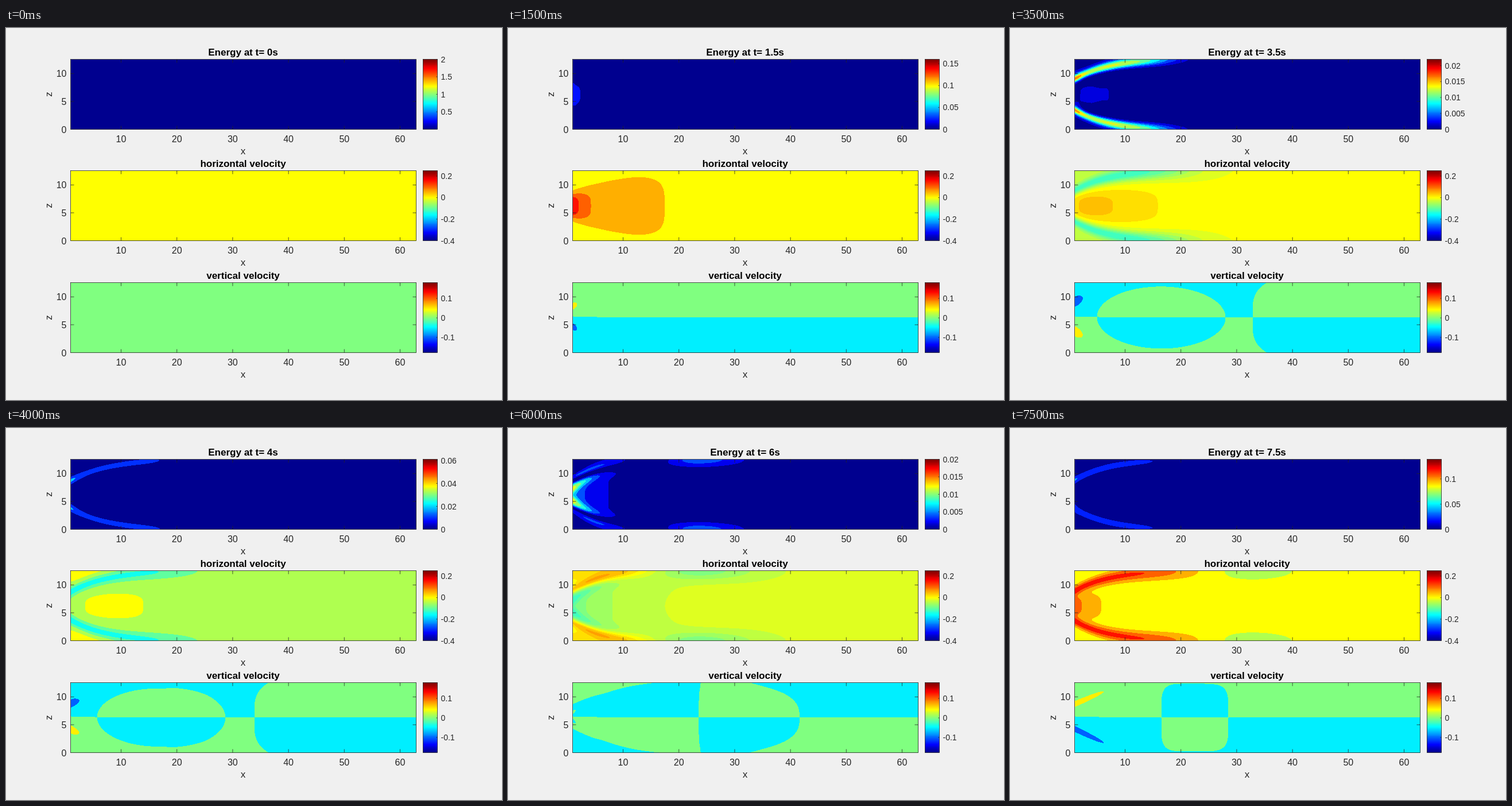
Write an HTML page with a canvas that moves like this. It is 864 px wide and 648 px high and loops after 8 s.

```html
<!DOCTYPE html>
<html lang="en">
<head>
<meta charset="utf-8">
<title>Wave energy and velocity</title>
<style>
html, body { margin: 0; width: 100%; height: 100%; overflow: hidden; background: #f0f0f0; }
canvas, svg { position: absolute; left: 0; top: 0; width: 864px; height: 648px; }
svg { font-family: "Liberation Sans", Arial, sans-serif; fill: #262626; }
</style>
</head>
<body>
<canvas id="plot" width="864" height="648"></canvas>
<svg viewBox="0 0 864 648"><g id="fixed"></g><g id="live"></g></svg>
<script>
const ctx = document.getElementById('plot').getContext('2d');
const fixed = document.getElementById('fixed'), live = document.getElementById('live');
const X0 = 112.5, W = 602, H = 122, UNIT = 9.72, TOPS = [54.5, 248.5, 443.5];
const BAR_X = 726.5, BAR_W = 25, STEP = 500, COUNT = 16;
const U_RANGE = [-.4, .25], W_RANGE = [-.178, .181];
const U_TICKS = [-.4, -.2, 0, .2], W_TICKS = [-.1, 0, .1];

const { exp, abs, min, max, floor } = Math;
const clamp = (v, lo, hi) => max(lo, min(hi, v));
const bell = v => exp(-v * v);
const cutoff = (x, reach) => exp(-((x / reach) ** 4));
const step01 = v => 1 / (1 + exp(-v));

// Field parts: x is pixels from the left wall, d pixels from the mid line.
const ray = (x, shift = 0) => 62 - (35 + shift) * exp(-x / 62);

// Jet along the mid line, widening as it goes.
const core = (x, d, near, decay, far, reach, width, spread) =>
  (near * exp(-x / decay) + far * exp(-x / reach)) / (1 + (d / (width + spread * x)) ** 4);

// Beam that bends from the wall to the edge of the channel.
const beam = (x, d, amp, reach, shift = 0) =>
  amp * cutoff(x, reach) * bell((d - ray(x, shift)) / (8 + .035 * x));

// Everything outside a ray.
const corner = (x, d, amp, reach, shift = -4) =>
  amp * cutoff(x, reach) * step01((d - ray(x, shift)) / 4);

const edgeSpot = (x, d, amp, mid, wide) =>
  amp * bell((x - mid) / wide) * bell((61 - d) / 15);

const lens = (x, d, amp, start, long, wide) =>
  amp * bell(x / long) * bell((d - start - .45 * x) / wide);

// -1 inside a rounded cell, 1 outside it.
function cell(x, d, left, mid, right, high, power) {
  const sx = abs(x - mid) / (x < mid ? mid - left : right - mid);
  return clamp(4 * (sx ** power + (d / high) ** power - 1), -1, 1);
}

// Horizontal (u) and vertical (w) velocity at key times; w is for the upper half.
const keys = [
  { t: 0, u: () => 0, w: () => 0 },
  { t: 1.5,
    u: (x, d) => core(x, d, .11, 20, .085, 300, 21, .5),
    w: (x, d) => .01 + lens(x, d, .08, 18, 8, 7) },
  { t: 2.5,
    u: (x, d) => core(x, d, .075, 43, .085, 300, 21, .26) + corner(x, d, -.065, 110),
    w: (x, d) => .003 + .015 * bell((d - 12 - .3 * x) / (8 + .08 * x)) * cutoff(x, 121)
      + corner(x, d, -.03, 75) },
  { t: 3.5,
    u: (x, d) => core(x, d, -.045, 20, .077, 107, 20, .13) + beam(x, d, -.11, 195)
      + corner(x, d, -.03, 200),
    w: (x, d) => -.015 * cell(x, d, 38, 150, 262, 54, 2)
      * clamp((309 + 25 * (d / 61) ** 4 - x) / 20, -1, 1) + lens(x, d, -.06, 26, 18, 12) },
  { t: 5,
    u: (x, d) => -.01 + core(x, d, -.08, 30, -.055, 300, 40, .3) + beam(x, d, -.12, 260, 6)
      + corner(x, d, .135, 130),
    w: (x, d) => -.015 * cell(x, d, 152, 180, 281, 51, 2.5) + corner(x, d, .03, 46)
      + lens(x, d, -.065, 20, 32, 7) },
  { t: 6.5,
    u: (x, d) => -.008 + core(x, d, -.04, 110, 0, 1, 60, .3) + .02 * bell((x - 233) / 80) * bell(d / 36)
      + edgeSpot(x, d, -.05, 230, 100) + beam(x, d, .16, 165) + beam(x, d, -.045, 150, 18)
      + corner(x, d, .03, 130),
    w: (x, d) => -.015 * cell(x, d, 219, 226, 403, 63, 2.7) + corner(x, d, .03, 400, 27)
      + lens(x, d, .06, 28, 32, 6) },
  { t: 7.5,
    u: (x, d) => .01 + core(x, d, .1, 35, .02, 100, 20, .2) + beam(x, d, .155, 205)
      + edgeSpot(x, d, -.03, 300, 75),
    w: (x, d) => .015 * cell(x, d, 150, 205, 267, 59, 5) + lens(x, d, .06, 22, 68, 7) }
];

const limits = [[0, 2], [.5, .1], [1.5, .16], [2.5, .06], [3, .022], [3.5, .022],
  [4.5, .1], [5, .139], [6, .02], [6.5, .02], [7.5, .139]];

// The pair of stops around t and the share of the second one.
function around(stops, t, timeOf) {
  const i = max(1, stops.findIndex(s => timeOf(s) >= t));
  const a = stops[i - 1], b = stops[i];
  return [a, b, (t - timeOf(a)) / (timeOf(b) - timeOf(a))];
}

function niceStep(limit, most) {
  for (let unit = .001; ; unit *= 10)
    for (const m of [1, 2, 5])
      if (limit / (unit * m) <= most + .01) return unit * m;
}

// 64 colours from dark blue through green to dark red.
const palette = Array.from({ length: 64 }, (_, k) =>
  [48, 32, 16].map(c => Math.round(255 * clamp((24 - abs(k + 1 - c)) / 16, 0, 1))));
const jet = f => palette[clamp(floor(f * 64 + 1e-6), 0, 63)];

function paint(n, field, step, [lo, hi]) {
  const img = ctx.createImageData(W, H);
  for (let y = 0, p = 0; y < H; y++) {
    for (let x = 0; x < W; x++, p += 4) {
      const v = floor(field(x, y) / step + 1e-9) * step;
      img.data.set(jet((v - lo) / (hi - lo)), p);
      img.data[p + 3] = 255;
    }
  }
  ctx.putImageData(img, X0 + .5, Math.round(TOPS[n]));
}

function line(x1, y1, x2, y2) {
  ctx.beginPath();
  ctx.moveTo(x1, y1);
  ctx.lineTo(x2, y2);
  ctx.stroke();
}

function drawAxes(n, ticks, [lo, hi]) {
  const top = TOPS[n], base = top + H;
  ctx.strokeStyle = '#262626';
  ctx.lineWidth = .8;
  ctx.strokeRect(X0, top, W, H);
  for (let v = 10; v <= 60; v += 10) {
    const x = X0 + (v - 1) * UNIT + .5;
    line(x, base, x, base - 6);
    line(x, top, x, top + 6);
  }
  for (const v of [5, 10]) {
    const y = base - v * 9.71;
    line(X0, y, X0 + 6, y);
    line(X0 + W, y, X0 + W - 6, y);
  }
  for (let r = 0; r < H; r++) {
    ctx.fillStyle = `rgb(${jet(1 - (r + .5) / H)})`;
    ctx.fillRect(BAR_X, top + r, BAR_W, min(1.5, H - r));
  }
  ctx.strokeRect(BAR_X, top, BAR_W, H);
  for (const v of ticks) {
    const y = base - (v - lo) / (hi - lo) * H;
    line(BAR_X + BAR_W - 2, y, BAR_X + BAR_W, y);
  }
}

function label(group, str, x, y, size, anchor = 'middle', extra = {}) {
  const el = document.createElementNS('http://www.w3.org/2000/svg', 'text');
  const attrs = { x, y, 'font-size': size, 'text-anchor': anchor, ...extra };
  for (const k in attrs) el.setAttribute(k, attrs[k]);
  el.textContent = str;
  group.appendChild(el);
}
const heading = (group, str, n) =>
  label(group, str, 413, TOPS[n] - 6.5, 17, 'middle', { 'font-weight': 'bold', fill: '#000' });
const barLabels = (group, n, ticks, [lo, hi]) => ticks.forEach(v =>
  label(group, String(v), 757.5, TOPS[n] + H - (v - lo) / (hi - lo) * H + 5, 14, 'start'));

TOPS.forEach((top, n) => {
  const base = top + H;
  for (let v = 10; v <= 60; v += 10) label(fixed, v, X0 + (v - 1) * UNIT + .5, base + 22, 16);
  for (const v of [0, 5, 10]) label(fixed, v, 105.5, base - v * 9.71 + 6, 16, 'end');
  label(fixed, 'x', 413, base + 43.5, 17);
  label(fixed, 'z', 0, 0, 17, 'middle', { transform: `translate(80 ${top + 61}) rotate(-90)` });
});
heading(fixed, 'horizontal velocity', 1);
heading(fixed, 'vertical velocity', 2);
barLabels(fixed, 1, U_TICKS, U_RANGE);
barLabels(fixed, 2, W_TICKS, W_RANGE);

function show(t) {
  const [a, b, mix] = around(keys, t, k => k.t);
  const blend = (name, x, d) =>
    (mix < 1 ? (1 - mix) * a[name](x, d) : 0) + (mix > 0 ? mix * b[name](x, d) : 0);
  const u = (x, y) => blend('u', x, abs(y + .5 - H / 2));
  const w = (x, y) => {
    const rise = 60 - 2 * exp(-x / 60) - y;
    return (rise > 0 ? 1 : -1) * blend('w', x, abs(rise));
  };

  const [p, q, part] = around(limits, t, s => s[0]);
  const limit = p[1] + (q[1] - p[1]) * part, range = [0, limit];
  const gap = niceStep(limit, 4.5), ticks = [];
  for (let k = t ? 0 : 1; k * gap <= limit + 1e-9; k++) ticks.push(+(k * gap).toFixed(3));
  const calm = limit < .03;

  ctx.clearRect(0, 0, 864, 648);
  paint(0, (x, y) => u(x, y) ** 2 + w(x, y) ** 2, niceStep(limit, 11), range);
  paint(1, u, calm ? .02 : .05, U_RANGE);
  paint(2, w, t === 2.5 ? .01 : .05, W_RANGE);
  drawAxes(0, ticks, range);
  drawAxes(1, U_TICKS, U_RANGE);
  drawAxes(2, W_TICKS, W_RANGE);
  live.replaceChildren();
  heading(live, `Energy at t= ${t}s`, 0);
  barLabels(live, 0, ticks, range);
}

let begin, shown = 0;
function tick(now) {
  begin ??= now;
  const i = floor((now - begin) / STEP) % COUNT;
  if (i !== shown) {
    shown = i;
    show(i / 2);
  }
  requestAnimationFrame(tick);
}
show(0);
requestAnimationFrame(tick);
</script>
</body>
</html>
```
